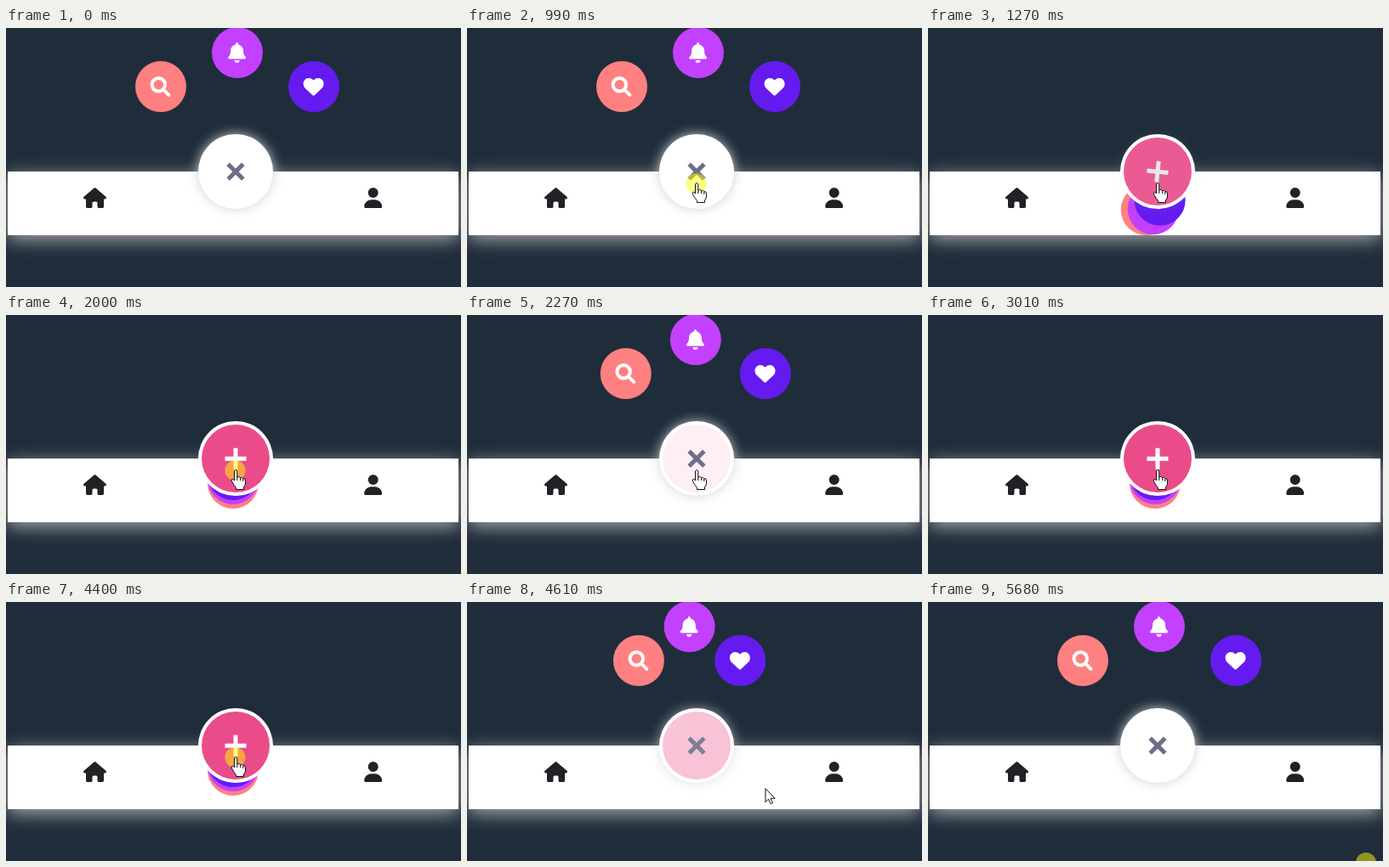
These frames come from a looping animation (535 by 305 pixels, 5750 ms). An HTML page with a canvas:

```html
<!DOCTYPE html>
<html lang="en">
<head>
<meta charset="utf-8">
<title>Floating action menu</title>
<style>
html, body { margin: 0; width: 100%; height: 100%; overflow: hidden; background: #1f2d3b; }
canvas { display: block; width: 535px; height: 305px; }
</style>
</head>
<body>
<canvas id="stage"></canvas>
<script>
const W = 535, H = 305, LOOP = 5750, TICK = 70, TAU = Math.PI * 2;
const canvas = document.getElementById('stage');
const ctx = canvas.getContext('2d');
const ratio = window.devicePixelRatio || 1;
canvas.width = W * ratio;
canvas.height = H * ratio;

// Icon outlines on a 512 unit grid, shown 24px high.
const ICONS = {
  home: { w: 576, d: 'M288 0q12 0 22 8L565 231q11 11 11 24q-2 30-32 32h-32V472q0 40-40 40H392q-40 0-40-40V384q0-32-32-32H256q-32 0-32 32v88q0 40-40 40H104q-40 0-40-40V287H32q-30-2-32-32q0-13 11-24L266 8q10-8 22-8z' },
  user: { w: 448, d: 'M96 128a128 128 0 1 1 256 0a128 128 0 1 1-256 0zM178 304C80 304 0 384 0 482q0 30 30 30H418q30 0 30-30C448 384 368 304 270 304z' },
  bell: { w: 448, d: 'M224 0q-32 2-32 32V51C119 66 64 131 64 208v19c0 47-17 92-48 128l-8 8C-11 384 4 416 32 416H416c28 0 43-32 24-53l-8-8C401 319 384 274 384 227V208c0-77-55-142-128-157V32q0-30-32-32zM160 448H288a64 64 0 0 1-128 0z' },
  heart: { w: 512, d: 'M48 300L228 469q28 22 56 0L464 300q48-46 48-115c0-70-50-130-119-141Q322 32 268 84L256 96 244 84Q190 32 119 44C50 55 0 115 0 185q0 69 48 115z' },
  search: { w: 512, line: 84, d: 'M42 208a166 166 0 1 1 332 0a166 166 0 1 1-332 0zM332 332L466 466' }
};
for (const icon of Object.values(ICONS)) icon.path = new Path2D(icon.d);

const HAND = new Path2D('M-1.5 1.8Q0-.8 1.8 1.8V9Q4 7.5 5.6 9.6Q7.8 8.6 8.8 10.6Q11.5 10 11.5 13V17Q11 19 9.5 21V23.5H.5V21.5Q-1.5 19-4.2 14.5Q-5.5 11.5-3.8 11Q-2.8 11-1.5 13ZM-1.5 13V1.8M1.8 9v4M5.6 10v3M8.8 11v3');
const ARROW = new Path2D('M.5 .5V16.5L4 12.9 6.6 18.5 9 17.4 6.5 12H11.7Z');

const ITEMS = [
  { icon: 'search', color: '#ff8080', side: -1 },
  { icon: 'bell', color: '#c340ff', side: 0 },
  { icon: 'heart', color: '#651bf0', side: 1 }
];

// Every press toggles the menu, which is open at the start.
const PRESSES = [990, 2000, 2670, 4400];
const PRESS_TIME = 130, LEAD = 50, DURATION = 260;

const HOME = [270, 182];
const ENTER = { from: [410, 266], start: 310, end: 860 };
const LEAVE = { to: [525, 300], start: 4470, end: 4890, gone: 5020 };

const clamp = v => Math.min(1, Math.max(0, v));
const lerp = (a, b, k) => a + (b - a) * k;
const snap = ms => Math.floor(ms / TICK) * TICK;
const easeOut = u => Math.sin(u * Math.PI / 2);
const backOut = (u, s) => 1 + (s + 1) * (u - 1) ** 3 + s * (u - 1) ** 2;

// open: colour and spacing; lift: height, which runs ahead of the spacing
function menuAt(t) {
  const toggles = PRESSES.map(p => p + PRESS_TIME).filter(time => time <= t);
  const opening = toggles.length % 2 === 0;
  if (!toggles.length) return { open: 1, lift: 1 };
  const u = clamp((snap(t - toggles.at(-1)) + LEAD) / DURATION);
  return opening
    ? { open: easeOut(u), lift: clamp(u * 2.5) }
    : { open: 1 - easeOut(u), lift: 1 - backOut(u, 2.7) };
}

function pointerAt(t) {
  if (t < ENTER.start || t >= LEAVE.gone) return null;
  if (t < LEAVE.start) {
    const u = clamp(snap(t - ENTER.start) / (ENTER.end - ENTER.start));
    return [
      lerp(ENTER.from[0], HOME[0], backOut(u, 1.7)),
      lerp(ENTER.from[1], HOME[1], easeOut(u))
    ];
  }
  const u = clamp(snap(t - LEAVE.start) / (LEAVE.end - LEAVE.start)) ** 1.05;
  return HOME.map((v, i) => lerp(v, LEAVE.to[i], u));
}

function disc(x, y, r, fill) {
  ctx.fillStyle = fill;
  ctx.beginPath();
  ctx.arc(x, y, r, 0, TAU);
  ctx.fill();
}

function glow(color, blur, dy) {
  ctx.shadowColor = color;
  ctx.shadowBlur = blur * ratio;
  ctx.shadowOffsetY = dy * ratio;
}

function drawIcon(name, x, y, color) {
  const { w, line, path } = ICONS[name], k = 24 / 512;
  ctx.save();
  ctx.translate(x, y);
  ctx.scale(k, k);
  ctx.translate(-w / 2, -256);
  ctx.fillStyle = ctx.strokeStyle = color;
  if (line) {
    ctx.lineWidth = line;
    ctx.lineCap = 'round';
    ctx.stroke(path);
  } else {
    ctx.fill(path);
  }
  ctx.restore();
}

function drawBar() {
  ctx.save();
  glow('#aaa', 20, 5);
  ctx.fillStyle = '#fff';
  ctx.fillRect(2, 169, 530, 75);
  ctx.restore();
  drawIcon('home', 104.5, 200, '#212126');
  drawIcon('user', 431.7, 200, '#212126');
}

function drawItems({ open, lift }) {
  const centre = lerp(267, 272, open) - 10 * Math.sin(open * Math.PI);
  for (const { icon, color, side } of ITEMS) {
    const x = centre + side * 90 * open;
    const y = lerp(193 - 5 * side, 29 + 40 * Math.abs(side), lift);
    disc(x, y, 30, color);
    drawIcon(icon, x - .4, y, '#fff');
  }
}

function drawButton(open) {
  const pink = 1 - open;
  ctx.save();
  glow(`rgba(208,208,208,${open})`, 14, 0);
  disc(270, 169, 44, '#fff');
  ctx.restore();
  disc(270, 169, 40, `rgba(234,76,137,${pink})`);

  const mix = c => Math.round(lerp(c, 255, pink * pink));
  ctx.save();
  ctx.translate(270, 169.2);
  ctx.rotate(clamp(open * 1.5) * Math.PI / 4);
  ctx.fillStyle = `rgb(${mix(109)},${mix(109)},${mix(139)})`;
  ctx.fillRect(-12.5, -2.5, 25, 5);
  ctx.fillRect(-2.5, -12.5, 5, 25);
  ctx.restore();
}

function drawPress(x, y) {
  disc(x, y, 12, 'rgba(255,255,0,.5)');
}

function drawPointer([x, y]) {
  const shape = Math.hypot(x - 270, y - 169) < 44 ? HAND : ARROW;
  ctx.save();
  ctx.translate(x, y);
  ctx.fillStyle = '#fff';
  ctx.strokeStyle = '#111';
  ctx.lineWidth = 1;
  ctx.fill(shape);
  ctx.stroke(shape);
  ctx.restore();
}

function render(t) {
  const menu = menuAt(t), tip = pointerAt(t);
  ctx.setTransform(ratio, 0, 0, ratio, 0, 0);
  ctx.fillStyle = '#1f2d3b';
  ctx.fillRect(0, 0, W, H);
  drawBar();
  drawItems(menu);
  drawButton(menu.open);
  if (PRESSES.some(p => t >= p && t < p + PRESS_TIME)) drawPress(269.5, 183);
  if (t >= LOOP - TICK) drawPress(515, 307);
  if (tip) drawPointer(tip);
}

const start = performance.now();
function loop() {
  render((performance.now() - start) % LOOP);
  requestAnimationFrame(loop);
}
loop();
</script>
</body>
</html>
```
